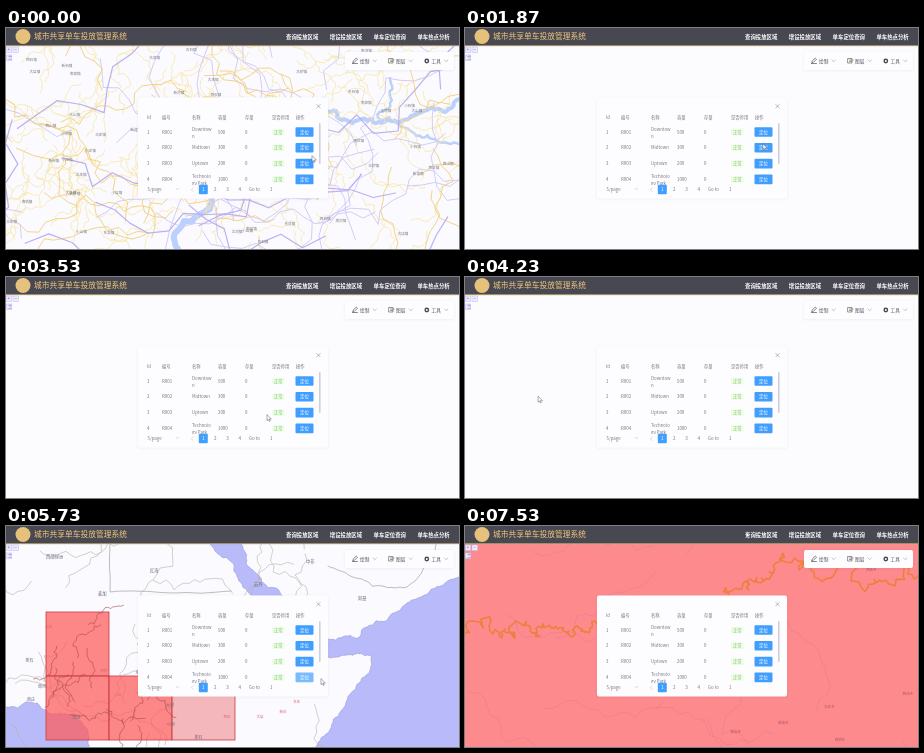
Animation of 453x221 px, one loop 7560 ms. Source, as an HTML page:

```html
<!DOCTYPE html>
<html lang="zh">
<head>
<meta charset="utf-8">
<style>
html, body { margin: 0; width: 100%; height: 100%; overflow: hidden; background: #fcfcff; }
#stage { display: block; width: 100vw; height: 100vh; font-family: "Noto Sans CJK SC", "Noto Sans CJK", "Noto Sans", sans-serif; }
#stage path { fill: none; stroke-linejoin: round; stroke-linecap: round; }
#stage path.sea { fill: #b9baf9; }
</style>
</head>
<body>
<svg id="stage" viewBox="0 0 453 221" preserveAspectRatio="none"></svg>
<script>
const LOOP = 7560;
const stage = document.getElementById('stage');

let seed = 11;
const rnd = () => (seed = (seed * 16807) % 2147483647) / 2147483647;
const pick = s => s[Math.floor(rnd() * s.length)];

const text = (x, y, s, size = 4.4, fill = '#777783', extra = '') =>
  `<text x="${x}" y="${y}" font-size="${size}" fill="${fill}" ${extra}>${s}</text>`;
const rect = (x, y, w, h, fill, extra = '') =>
  `<rect x="${x}" y="${y}" width="${w}" height="${h}" fill="${fill}" ${extra}/>`;
const path = (d, stroke, width = 1, extra = '') =>
  `<path d="${d}" stroke="${stroke}" stroke-width="${width}" ${extra}/>`;
const repeat = (n, fn) => Array.from({ length: n }, (_, i) => fn(i)).join('');
const layer = (id, body) => `<g id="${id}">${body}</g>`;

// Roughens a line through key points by repeated midpoint displacement.
function rough(points, amount = .4, depth = 4) {
  let pts = points.split(' ').map(p => p.split(',').map(Number));
  while (depth--) {
    pts = pts.flatMap(([x, y], i) => {
      if (i === pts.length - 1) return [[x, y]];
      const [nx, ny] = pts[i + 1], k = (rnd() - .5) * amount;
      return [[x, y], [(x + nx) / 2 - (ny - y) * k, (y + ny) / 2 + (nx - x) * k]];
    });
  }
  return 'M' + pts.map(p => p.map(v => v.toFixed(1)).join(' ')).join('L');
}

// A rough line of the given length from a random place inside a box.
function stray(x, y, w, h, length, amount = .6) {
  const x0 = x + rnd() * w, y0 = y + rnd() * h, a = rnd() * 6.28;
  return rough(`${x0},${y0} ${x0 + length * Math.cos(a)},${y0 + length * Math.sin(a)}`, amount);
}
const strays = (n, box, length, color, width) => repeat(n, () => path(stray(...box, length), color, width));

const placeName = (suffix = '镇') => pick('东西南北新古大小') + pick('桥河山店庄林泉石') + suffix;
const names = (n, [x, y, w, h], size, fill, suffix) => repeat(n, () =>
  text((x + rnd() * w).toFixed(1), (y + rnd() * h).toFixed(1), placeName(suffix), size, fill));

const WORLD = [0, 20, 445, 198];

function cityMap() {
  const river = (points, width) => path(rough(points, .5), '#bcd0fc', width);
  return rect(0, 0, 453, 221, '#fbfaff')
    + river('453,71 425,80 405,88 366,91 330,83 300,92', 4)
    + river('384,50 372,90 410,108 453,116', 2.5)
    + river('172,221 204,181 232,148', 6)
    + strays(170, WORLD, 55, '#f6e7a8', .8)
    + strays(26, WORLD, 190, '#d3ccf7', 1)
    + strays(26, WORLD, 130, '#f3d487', 1)
    + strays(9, WORLD, 300, '#bbb0f2', 1.2)
    + names(65, WORLD, 3.6, '#77777f');
}

function africaMap() {
  const box = (col, row, fill) => rect(40 + col * 63, 86 + row * 64, 63, 64, fill, 'stroke="#c83a42" stroke-width=".8" fill-opacity=".72"');
  const coast = points => path(rough(points, .35), '#9699dd', .6, 'class="sea"');
  const places = ['西部绿洲', '麦加', '红海', '乍得', '苏丹', '中非', '阿曼'];
  return rect(-200, -200, 900, 700, '#fafaff')
    + coast('200,0 212,28 232,52 262,80 300,118 322,131 350,128 366,130 355,155 335,185 310,221 300,245 520,245 520,20 453,51 410,73 380,95 352,112 322,113 290,88 262,62 240,32 222,0')
    + coast('-90,180 0,181 40,184 68,188 82,205 80,245 -90,245')
    + strays(24, [0, 20, 310, 195], 80, '#b9b2a6', .6)
    + path(rough('104,18 104,66 225,65', .05), '#a7a19b', .7)
    + path(rough('322,40 366,60 401,61 430,18', .2), '#a7a19b', .7)
    + box(0, 0, '#ff5a58') + box(0, 1, '#ff5a58') + box(1, 1, '#ff5a58') + box(2, 1, '#f3a0a2')
    + strays(9, [48, 95, 40, 100], 40, '#a84a4c', .6) + strays(6, [105, 155, 45, 45], 40, '#a84a4c', .6)
    + places.map((s, i) => text(40 + i * 52, 32 + (i * 37) % 60, s, 4.3, '#6d6a78')).join('')
    + names(16, [0, 100, 300, 115], 4, '#6d6a78', '')
    + names(8, [30, 90, 400, 110], 3.5, '#e0636d', '');
}

const PINK = '#fd8a8d', ORANGE = '#ef7f3f';

function patch() {
  return `<svg x="23" y="60" width="161" height="117">${rect(0, 0, 161, 117, PINK)}${rect(72, 0, 89, 117, '#fa8e82')}`
    + strays(12, [75, 5, 80, 105], 60, '#c9688f', .8)
    + path(rough('72,91 103,77 130,61 161,46', .8), ORANGE, 1.3)
    + path(rough('97,0 108,44 124,91 161,106', .8), ORANGE, 1.3) + '</svg>'
    + path('M23 60.5H184V177.5H23', '#dc8578', .7) + text(152, 187, 'Ape', 3.8, '#77738a');
}

function pinkMap() {
  const river = points => path(rough(points, 1.3), ORANGE, 1.6);
  return rect(0, 18, 453, 203, PINK)
    + strays(12, WORLD, 120, '#e87f90', .6)
    + river('0,118 28,108 50,112 75,110 95,102 112,100 132,97')
    + river('262,72 284,64 304,46 334,44 359,54 394,56 424,58 453,50')
    + names(6, WORLD, 3.6, '#a85769', '乡');
}

function header() {
  const items = ['查询投放区域', '增设投放区域', '单车定位查询', '单车热点分析'];
  return rect(0, 0, 453, 18, '#484852') + rect(0, 17.3, 453, .9, '#c9ad75')
    + '<circle cx="17" cy="8.5" r="7.5" fill="#e6c17c"/>'
    + text(28, 11.3, '城市共享单车投放管理系统', 7.75, '#f0c87c', 'font-weight="500"')
    + items.map((s, i) => text(280 + i * 43.8, 10.7, s, 5.4, '#fff', 'font-weight="700"')).join('');
}

function tools() {
  const item = (x, s) => text(x, 34.8, s, 4.7, '#555560')
    + path(`M${x + 13} 32l1.7 1.7 1.7-1.7`, '#9999a5', .6);
  return rect(339, 24, 109, 18, '#fdfdff', 'rx="2" filter="url(#soft)"')
    + path('M346.8 34.8l.5-1.8 3-3 1.2 1.2-3 3zM346.5 35.5h5', '#555560', .7)
    + path('M383 30.5h4v4.5h-4zM384.5 32h3.5M384.5 33.5h2', '#706b62', .7)
    + '<circle cx="420.8" cy="33" r="1.7" fill="none" stroke="#484852" stroke-width="1.4"/>'
    + item(354, '绘制') + item(390, '图层') + item(425.5, '工具');
}

function zoomControl() {
  const key = (x, y, s) => rect(x, y, 5.5, 5.5, '#eeecff', 'stroke="#bcb7ed" stroke-width=".5"')
    + text(x + 1.3, y + 4.3, s, 5, '#6d68ba');
  return key(0.3, 19, '+') + key(7, 19, '−') + key(0.3, 27, '±');
}

function dialog() {
  const cols = [141, 156, 186, 212, 239, 266, 290];
  const heads = ['Id', '编号', '名称', '容量', '存量', '是否停用', '操作'];
  const rows = [['Downtow', 'n', 500], ['Midtown', '', 300], ['Uptown', '', 200], ['Technolo', 'gy Park', 1000]];
  const row = ([name, rest, size], i) => {
    const y = 104 + i * 15.8, base = y + 1.5;
    return text(cols[0], base, i + 1) + text(cols[1], base, 'R00' + (i + 1))
      + text(cols[2], rest ? base - 3 : base, name) + text(cols[2], base + 4, rest)
      + text(cols[3], base, size) + text(cols[4], base, 0)
      + rect(266, y - 3.3, 12.5, 6.6, '#effbe9', 'rx="1"') + text(268, base, '正常', 4.2, '#7bcb59')
      + rect(289.5, y - 4.8, 18, 9.6, '#409eff', 'rx="1" class="locate"') + text(294, base + .1, '定位', 4.5, '#fff');
  };
  return rect(132, 69.5, 190, 101, '#fdfdff', 'rx="2" filter="url(#soft)"')
    + path('M310.8 76.5l3.4 3.4M314.2 76.5l-3.4 3.4', '#8a8a98', .6)
    + heads.map((s, i) => text(cols[i], 90.5, s, 4.3, '#777783', 'font-weight="500"')).join('')
    + rows.map(row).join('')
    + rect(313, 95, 1.6, 41, '#cfcfda', 'rx=".8"')
    + rect(139, 157, 169, 9.5, '#fdfdff')
    + text(141.5, 163.3, '5/page')
    + path('M170 160.3l1.4 1.4 1.4-1.4M187 160l-1.6 1.7 1.6 1.7', '#b5b5c0', .5)
    + rect(192.8, 156.8, 9, 9.4, '#409eff', 'rx="1"') + text(196, 163.3, 1, 4.6, '#fff')
    + repeat(3, i => text(208 + i * 12.3, 163.3, i + 2, 4.6))
    + text(243, 163.3, 'Go to') + text(264, 163.3, 1);
}

stage.innerHTML = `<defs><filter id="soft" x="-10%" y="-20%" width="120%" height="140%">
  <feDropShadow dx="0" dy=".5" stdDeviation="1" flood-color="#55556a" flood-opacity=".1"/></filter></defs>`
  + rect(0, 0, 453, 221, '#fcfcff')
  + layer('city', cityMap()) + layer('patch', patch()) + layer('africa', africaMap()) + layer('pink', pinkMap())
  + layer('flecks', path('M1 55V140', '#a9b9f2', 2, 'stroke-dasharray="3 9 7 5"'))
  + zoomControl() + header() + tools() + dialog()
  + layer('cursor', '<path d="M0 0V5.6L1.4 4.4 2.3 6.4 3.2 6 2.3 4.1H4Z" style="fill:#fff" stroke="#55556a" stroke-width=".5"/>');

const el = id => document.getElementById(id);
const locate = [...document.querySelectorAll('.locate')];
const show = (id, on) => el(id).style.display = on ? '' : 'none';
const clamp = p => Math.min(1, Math.max(0, p));
const ease = p => p * p * (3 - 2 * p);
const glide = (t, start, length) => ease(clamp((t - start) / length));
const within = (t, a, b) => t >= a && t < b;
const zoomAt = (x, y, s) => `translate(${x} ${y}) scale(${s}) translate(${-x} ${-y})`;

// Each stop: when the pointer sets off, how long it travels, where it rests.
const STOPS = [[0, 600, 295, 106], [1650, 500, 302, 130], [2800, 500, 261, 138],
  [3650, 650, 67, 119], [5050, 650, 315, 153], [6350, 950, 281, 6]];

const cursorAt = t => STOPS.reduce(([x, y], [start, length, toX, toY]) => {
  const p = glide(t, start, length);
  return [x + (toX - x) * p, y + (toY - y) * p];
}, [306, 128]);

function draw() {
  const t = performance.now() % LOOP;
  show('city', t < 930);
  show('patch', within(t, 4450, 5050));
  show('africa', within(t, 5050, 6300));
  show('pink', t >= 6450);
  show('flecks', within(t, 1900, 2600));

  el('patch').setAttribute('transform', zoomAt(68, 121, 2 - glide(t, 4450, 280) - .5 * glide(t, 4800, 250)));
  el('africa').setAttribute('transform', zoomAt(68, 121, 1.5 - .5 * glide(t, 5050, 300)));

  const hovered = within(t, 550, 1800) ? 0 : within(t, 5400, 5950) ? 3 : -1;
  locate.forEach((b, i) => b.setAttribute('fill', i === hovered ? '#79bbff' : '#409eff'));
  el('cursor').setAttribute('transform', `translate(${cursorAt(t)})`);
  requestAnimationFrame(draw);
}
draw();
</script>
</body>
</html>
```
